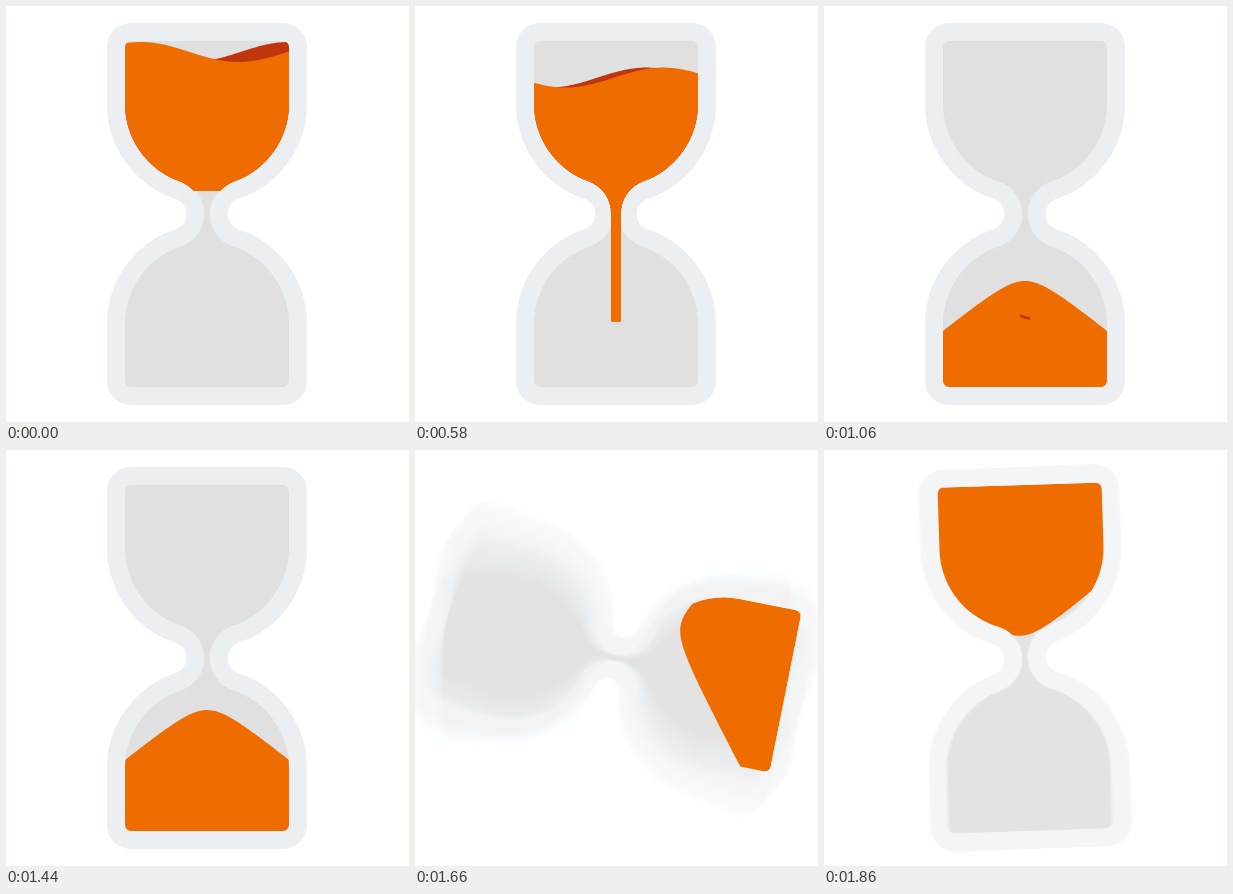
An HTML page with a canvas for the animation above (1880 ms loop, 403 px wide and 416 px high).

```html
<!DOCTYPE html>
<html lang="en">
<head>
<meta charset="utf-8">
<title>Hourglass</title>
<style>
  html, body { margin: 0; width: 403px; height: 416px; overflow: hidden; background: #fff; }
  canvas { display: block; }
</style>
</head>
<body>
<canvas id="stage" width="403" height="416"></canvas>
<script>
const ctx = document.getElementById('stage').getContext('2d');
const LOOP = 1880, STEP = 20, SHUTTER = 14, SAMPLES = 24;
const CX = 201, CY = 208, FLOOR = 381, REACH = 320;
const WALL = '#eceff1', INSIDE = '#e0e0e0', SAND = '#ef6c00', SHADE = '#bf360c';

// Bulbs have radius 82, the neck is rounded with radius 34.
const glass = new Path2D(`M125 35H277a6 6 0 0 1 6 6V98A82 82 0 0 1 228.4 175.3
  A34 34 0 0 0 228.4 240.7A82 82 0 0 1 283 318V375a6 6 0 0 1 -6 6H125a6 6 0 0 1 -6 -6V318
  A82 82 0 0 1 173.6 240.7A34 34 0 0 0 173.6 175.3A82 82 0 0 1 119 98V41a6 6 0 0 1 6 -6Z`);

// Upper bulb together with the channel of the falling stream.
const funnel = new Path2D(`M125 35H277a6 6 0 0 1 6 6V98A82 82 0 0 1 228.4 175.3
  A34 34 0 0 0 206 208V381H196V208A34 34 0 0 0 173.6 175.3A82 82 0 0 1 119 98V41a6 6 0 0 1 6 -6Z`);

const clamp = v => Math.min(1, Math.max(0, v));
const smooth = v => { v = clamp(v); return v * v * (3 - 2 * v); };

// Half turn that swings back first and overshoots at the end.
function angleAt(t) {
  const back = 1.785;
  const x = Math.min(2, Math.max(0, (t - 1446) / 220));
  const half = v => v * v * ((back + 1) * v - back) / 2;
  return -Math.PI * (x < 1 ? half(x) : 1 - half(2 - x));
}

function turned(angle, draw) {
  ctx.save();
  ctx.translate(CX, CY);
  ctx.rotate(angle);
  ctx.translate(-CX, -CY);
  draw();
  ctx.restore();
}

function paintGlass(c) {
  c.lineWidth = 36;
  c.lineJoin = 'round';
  c.strokeStyle = WALL;
  c.stroke(glass);
  c.fillStyle = INSIDE;
  c.fill(glass);
}

// Opaque picture of the empty glass, large enough to cover the stage when turned.
const sprite = document.createElement('canvas');
sprite.width = sprite.height = 2 * REACH;
const sctx = sprite.getContext('2d');
sctx.fillStyle = '#fff';
sctx.fillRect(0, 0, 2 * REACH, 2 * REACH);
sctx.translate(REACH - CX, REACH - CY);
paintGlass(sctx);

function drawBlurredGlass(t) {
  for (let i = 0; i < SAMPLES; i++) {
    const shift = ((i + 0.5) / SAMPLES - 0.5) * SHUTTER;
    turned(angleAt(t + shift), () => {
      ctx.globalAlpha = 1 / (i + 1); // running average
      ctx.drawImage(sprite, CX - REACH, CY - REACH);
    });
  }
}

function fillBelow(surface, bottom, color) {
  ctx.beginPath();
  ctx.moveTo(110, bottom);
  for (let x = 110; x <= 292; x += 2) ctx.lineTo(x, Math.min(bottom, surface(x)));
  ctx.lineTo(292, bottom);
  ctx.fillStyle = color;
  ctx.fill();
}

function drawUpperSand(t) {
  const u = t / 760;
  const level = 46 + 20 * u + 42 * u ** 5.2;
  const tip = Math.min(FLOOR, 185 + 110 * (t / 540) ** 2.4);
  const wave = crest => x => level - 10 * Math.cos((x - crest) * 2 * Math.PI / 195);
  ctx.save();
  ctx.clip(funnel);
  fillBelow(wave(88 + 0.247 * t), tip, SHADE);
  fillBelow(wave(135 + 0.195 * t), tip, SAND);
  ctx.restore();
}

function drawHeap(t) {
  const slide = clamp((t - 1440) / 430);
  const peakX = CX + 46 * Math.sin(Math.PI * slide ** 1.2);
  const rise = 121 * Math.sin(clamp((t - 720) / 500) * Math.PI / 2);
  const dip = 5 * Math.sin(Math.PI * slide);
  const peakY = FLOOR - rise + dip - 30 * smooth((t - 1700) / 160);
  turned(angleAt(t), () => {
    ctx.clip(glass);
    fillBelow(x => peakY - 20 + Math.hypot(0.818 * (x - peakX), 20), FLOOR, SAND);
  });
}

function draw(t) {
  ctx.fillStyle = '#fff';
  ctx.fillRect(0, 0, 403, 416);
  if (t > 1440) drawBlurredGlass(t);
  else paintGlass(ctx);
  if (t > 720) drawHeap(t);
  if (t < 1100) drawUpperSand(t);
}

const start = performance.now();
function tick() {
  const t = (performance.now() - start) % LOOP;
  draw(Math.floor(t / STEP) * STEP);
  requestAnimationFrame(tick);
}
tick();
</script>
</body>
</html>
```
